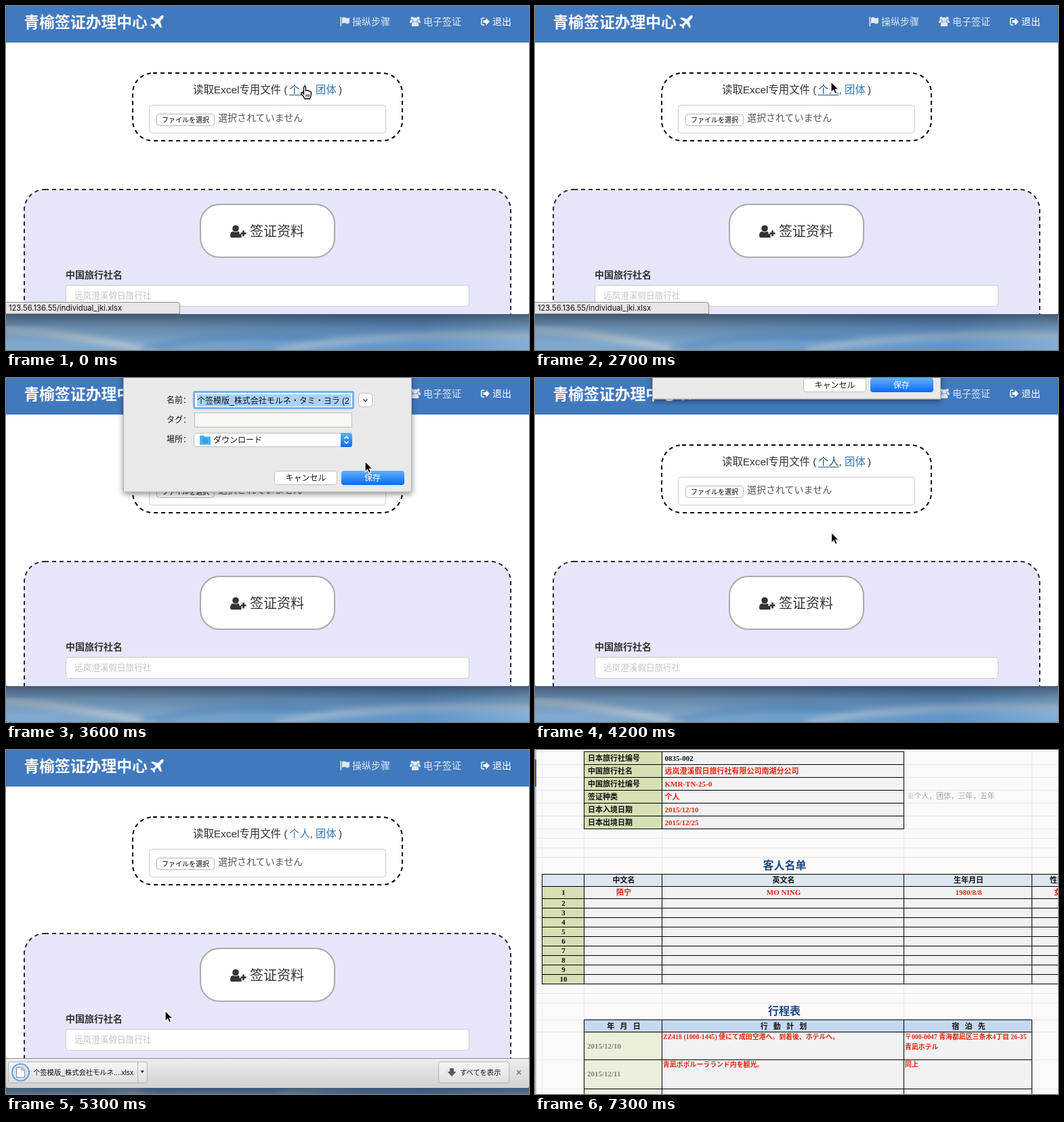
Animation of 772x508 px, one loop 7400 ms. Source, as an HTML page:

```html
<!DOCTYPE html>
<html lang="zh-CN">
<head>
<meta charset="utf-8">
<title>签证资料</title>
<style>
html, body { margin: 0; width: 100%; height: 100%; overflow: hidden; background: #fff; }
svg { display: block; width: 772px; height: 508px; }
text { font-family: "Liberation Sans", "Noto Sans CJK SC", "Noto Sans CJK", sans-serif; white-space: pre; }
.ja { font-family: "Liberation Sans", "Noto Sans CJK JP", "Noto Sans CJK", sans-serif; }
.ui { font-size: 12px; fill: #111; }
.bar { font-size: 10.3px; font-weight: 500; fill: #111; }
.sheet text { font-family: "Liberation Serif", "Noto Sans CJK SC", "Noto Sans CJK", serif; font-weight: 700; }
.nav { font-size: 14px; fill: #dfe8f4; }
.b { font-weight: 700; }
.mid { text-anchor: middle; }
</style>
</head>
<body>
<svg viewBox="0 0 772 508" xmlns="http://www.w3.org/2000/svg">
  <defs>
    <linearGradient id="sky">
      <stop offset="0" stop-color="#7ea9cf"/><stop offset=".3" stop-color="#7da4c8"/>
      <stop offset=".55" stop-color="#6d9dcb"/><stop offset=".8" stop-color="#5f94c8"/><stop offset="1" stop-color="#83aed6"/>
    </linearGradient>
    <linearGradient id="shade" x2="0" y2="1">
      <stop offset="0" stop-color="#223044" stop-opacity=".65"/><stop offset=".45" stop-color="#223044" stop-opacity=".25"/>
      <stop offset="1" stop-color="#223044" stop-opacity="0"/>
    </linearGradient>
    <linearGradient id="grey" x2="0" y2="1"><stop offset="0" stop-color="#ededed"/><stop offset="1" stop-color="#d3d3d3"/></linearGradient>
    <linearGradient id="pale" x2="0" y2="1"><stop offset="0" stop-color="#f6f6f6"/><stop offset="1" stop-color="#dedede"/></linearGradient>
    <linearGradient id="blue" x2="0" y2="1"><stop offset="0" stop-color="#5fb2fb"/><stop offset="1" stop-color="#0a6af4"/></linearGradient>
    <linearGradient id="tile" x2="0" y2="1"><stop offset="0" stop-color="#7d9fd2"/><stop offset="1" stop-color="#3d62a8"/></linearGradient>
    <linearGradient id="snow" x2="0" y2="1"><stop offset="0" stop-color="#fff"/><stop offset="1" stop-color="#dce3ee"/></linearGradient>
    <filter id="blur"><feGaussianBlur stdDeviation="5"/></filter>
    <filter id="drop" x="-10%" y="-10%" width="120%" height="125%"><feDropShadow dx="0" dy="3" stdDeviation="4" flood-opacity=".45"/></filter>
    <clipPath id="view"><path d="M0 0H772V451Q772 455 768 455H4Q0 455 0 451Z"/></clipPath>
    <clipPath id="wipe"><rect id="wipeBox" y="455" width="0" height="44"/></clipPath>
    <clipPath id="nameClip"><rect x="280" y="22" width="229" height="22"/></clipPath>
  </defs>

  <rect y="440" width="772" height="68" fill="url(#sky)"/>
  <g filter="url(#blur)" fill="none" stroke-width="9">
    <path d="M-20 476Q90 480 220 512" stroke="#c8cfd3" opacity=".75"/>
    <path d="M200 508Q320 478 480 494" stroke="#4c86be" opacity=".6"/>
    <path d="M400 510Q560 478 790 488" stroke="#c5cdd4" opacity=".6"/>
  </g>

  <g id="shelf">
    <rect y="499" width="772" height="42" fill="url(#shade)"/>
    <rect y="440" width="772" height="59" rx="4" fill="#d3d3d3"/>
    <rect y="456" width="772" height="40" fill="url(#grey)"/>
    <path d="M0 455.5H772" stroke="#8d8d8d"/>
    <g clip-path="url(#wipe)">
      <rect x="3.5" y="460.5" width="205" height="31" rx="3" fill="url(#pale)" stroke="#b0b0b0"/>
      <path d="M194.5 461V491" stroke="#b8b8b8"/>
      <path d="M198.500 473.500h5.500l-2.700 3.500z" fill="#222"/>
      <circle id="ring" cx="21.500" cy="476" r="12.500" fill="#cfe3f8" stroke="#3d87dc" stroke-width="2"/>
      <path d="M15.500 468.500h7.500l4.500 4.500v10.500h-12zM23 468.500v4.500h4.500" fill="#fff" stroke="#8a8a8a"/>
      <text class="ja bar" x="40" y="480">个签模版_株式会社モルネ....xlsx</text>
    </g>
    <rect x="638.5" y="460.5" width="104" height="31" rx="3" fill="url(#pale)" stroke="#b0b0b0"/>
    <path d="M655 470h6v5h3.500l-6.500 7-6.500-7h3.500z" fill="#585858"/>
    <text class="ja bar" x="670" y="480">すべてを表示</text>
    <path d="M754 473l6 6m0-6l-6 6" stroke="#777" stroke-width="1.5"/>
  </g>

  <g clip-path="url(#view)">
    <rect width="772" height="456" fill="#fff"/>
    <rect width="772" height="54" fill="#4179bf"/>
    <text class="b" x="26.500" y="31.500" font-size="22.800" fill="#fff">青榆签证办理中心</text>
    <path fill="#fff" d="M232 14c1.500 1.500 0 4-2 6l-2.500 2.500 2.500 8.500-2 1.500-4.500-7-4 4 .5 3-1.500 1.300-2-3.500-3.500-2 1.300-1.500 3 .5 4-4-7-4.500 1.500-2 8.500 2.500 2.500-2.500c2-2 4-3.500 5.200-2.800z"/>
    <g fill="#dfe8f4">
      <path d="M493.500 16h1.600v14h-1.600zM496 17.500q3-2 5.500 0 2.500 1.200 5.500-.5v8q-3 2-5.500.5-2.500-1.300-5.500.5z"/>
      <circle cx="604" cy="20" r="3.300"/><circle cx="599.500" cy="18" r="2.200"/><circle cx="608.500" cy="18" r="2.200"/>
      <path d="M599 30q-1-6.500 3-6.500h4q4 0 3 6.500zM596 25q0-4.500 2.500-4.500h1.500q0 2 1 2.500-2 .5-2.500 2zM612 25q0-4.500-2.500-4.500h-1.500q0 2-1 2.500 2 .5 2.500 2z"/>
    </g>
    <path d="M706 18h-2.500q-1.700 0-1.700 1.700v6.600q0 1.700 1.700 1.700h2.500" fill="none" stroke="#fff" stroke-width="1.500"/>
    <path d="M704.500 21h4v-3.500l5.500 5.500-5.500 5.500v-3.500h-4z" fill="#fff"/>
    <text class="nav" x="511" y="28">操纵步骤</text>
    <text class="nav" x="616" y="28">电子签证</text>
    <text class="nav" x="718" y="28" style="fill:#fff">退出</text>

    <rect x="187" y="99" width="398" height="100" rx="30" fill="none" stroke="#000" stroke-width="2" stroke-dasharray="6 5"/>
    <g font-size="15.400" fill="#333">
      <text x="276" y="129">读取Excel专用文件 (</text>
      <text id="link" x="418" y="129">个人</text>
      <text x="448.500" y="129">,</text>
      <text x="457" y="129" fill="#337ab7">团体</text>
      <text x="491" y="129">)</text>
    </g>
    <path id="under" d="M418 131.500H448.500" stroke="#23527c"/>
    <rect x="211.5" y="146.5" width="349" height="41" rx="4" fill="#fff" stroke="#ccc"/>
    <rect x="222.5" y="159.500" width="85" height="17" rx="4" fill="#fff" stroke="#b4b4b4"/>
    <text class="ja" x="230" y="171.500" font-size="10" fill="#000">ファイルを選択</text>
    <text class="ja" x="313" y="169.500" font-size="14" fill="#555">選択されていません</text>

    <rect x="27" y="271" width="718" height="300" rx="30" fill="#e6e6fa" stroke="#2a2a30" stroke-width="2" stroke-dasharray="6 5"/>
    <rect x="287" y="293" width="198" height="78" rx="28" fill="#fff" stroke="#aaa" stroke-width="2"/>
    <g fill="#333">
      <circle cx="339" cy="328.500" r="4.800"/>
      <path d="M333 342q-2 0-2-3 0-6 4.500-6 3.500 2 7 0l2 .8v3h3v5.200zM346.500 334.500h2.700v-3h2.600v3h2.700v2.700h-2.700v3h-2.600v-3h-2.700z"/>
      <text x="360" y="339.500" font-size="20">签证资料</text>
      <text class="b" x="88" y="402" font-size="14">中国旅行社名</text>
    </g>
    <rect x="88.5" y="412.5" width="595" height="31" rx="4" fill="#fff" stroke="#ccc"/>
    <text x="101" y="432" font-size="12.600" fill="#c3c3c3">远岚澄溪假日旅行社</text>
  </g>

  <g id="status">
    <path d="M-1 437.500H253Q256.500 437.500 256.500 441V454.500H-1Z" fill="#e6e6e6" stroke="#8c8c8c"/>
    <text x="4" y="450" font-size="11.200" fill="#111" style="font-family:Inter,sans-serif">123.56.136.55/individual_jki.xlsx</text>
  </g>

  <g id="badge">
    <rect x="3.500" y="190.500" width="119" height="113" rx="9" fill="url(#tile)" stroke="#8c9fbe" stroke-width="2" filter="url(#drop)"/>
    <path d="M43 209H82Q84 209 84 211V248H100Q103 248 101 251L65 285Q62 288 59 285L24 251Q22 248 25 248H41V211Q41 209 43 209Z" fill="url(#snow)"/>
  </g>

  <g id="dialog">
    <rect x="173.500" y="-20" width="425" height="188" fill="#e9e9ea" stroke="#b5b5b5" filter="url(#drop)"/>
    <g class="ui">
      <text class="ja" x="237" y="37">名前：</text>
      <text class="ja" x="237" y="66">タグ：</text>
      <text class="ja" x="237" y="95">場所：</text>
    </g>
    <rect x="277.500" y="20.500" width="235" height="24" rx="2" fill="#fff" stroke="#70b3f2" stroke-width="3"/>
    <g clip-path="url(#nameClip)">
      <rect x="282" y="24" width="228" height="18" fill="#a9d1fb"/>
      <text class="ja ui" x="282" y="37.500">个签模版_株式会社モルネ・タミ・ヨラ (2</text>
    </g>
    <rect x="520.500" y="22.500" width="20" height="20" rx="4" fill="#fff" stroke="#bbb"/>
    <path d="M527.500 31.500l3 3 3-3" fill="none" stroke="#333" stroke-width="1.500"/>
    <rect x="278.500" y="51.500" width="232" height="21" fill="#f9f7f3" stroke="#bcbcbc"/>
    <rect x="277.500" y="81.500" width="233" height="20" rx="4" fill="#fff" stroke="#c0c0c0"/>
    <path d="M494 81H507Q511 81 511 85V98Q511 102 507 102H494Z" fill="url(#blue)"/>
    <path d="M499.500 89.500l3-3 3 3m-6 4l3 3 3-3" fill="none" stroke="#fff" stroke-width="1.500"/>
    <path d="M286 85h6l1.500 1.500h8.500v12h-16z" fill="#45b4ec"/>
    <circle cx="294" cy="92.500" r="3.500" fill="none" stroke="#2487c4"/>
    <path d="M294 90v4m-1.500-1.500l1.500 1.500 1.500-1.500" fill="none" stroke="#2487c4"/>
    <text class="ja ui" x="306" y="95.500">ダウンロード</text>
    <rect x="396.500" y="137.500" width="92" height="20" rx="4" fill="#fff" stroke="#c0c0c0"/>
    <text class="ja ui mid" x="442.500" y="152">キャンセル</text>
    <rect x="495" y="137" width="93" height="21" rx="4" fill="url(#blue)"/>
    <text class="ja ui mid" x="541" y="152" style="fill:#fff">保存</text>
  </g>

  <g id="sheet" class="sheet"></g>

  <g id="arrow">
    <path d="M0 0V15.500L3.600 12.200 6 17.600 8.700 16.400 6.400 11.200H11.200Z" fill="#000" stroke="#fff" stroke-width="1.200"/>
  </g>
  <g id="hand">
    <path d="M-1.500 1.500Q-1.500 0 0 0 1.500 0 1.500 1.500V6Q3 4.500 4.300 6.300 6 5.300 7 7.200 9.300 6.500 9.300 9V12Q9 15 7.500 18H0Q-2.500 13.500-5 11-6 9 -4 9 -2.500 9.300-1.500 11Z" fill="#fff" stroke="#000" stroke-width="1.300"/>
    <path d="M2 11.500v3.500m2.200-3.500v3.500m2.200-3.500v3.500" stroke="#000"/>
  </g>
</svg>
<script>
const LOOP = 7400, STEP = 100;
const $ = id => document.getElementById(id);
const set = (id, attrs) => { for (const k in attrs) $(id).setAttribute(k, attrs[k]); };
const show = (id, on) => set(id, { visibility: on ? 'visible' : 'hidden' });
const prog = (t, a, b) => Math.min(1, Math.max(0, (t - a) / (b - a)));
const ease = p => p * p * (3 - 2 * p);

// Spreadsheet
const RED = '#e3220e', NAVY = '#1f4788', GREEN = '#d5e0b4', CELL = '#f2f2f2', HEAD = '#dce7f3';
const cols = [10, 72, 187, 544, 733, 800];

const cell = (c, y, h, fill) =>
  `<rect x="${cols[c] + .5}" y="${y + .5}" width="${cols[c + 1] - cols[c]}" height="${h}" fill="${fill}" stroke="#000"/>`;
const label = (s, x, y, fill = '#111', size = 11, cls = '') =>
  `<text x="${x}" y="${y}" fill="${fill}" font-size="${size}" class="${cls}">${s}</text>`;
const mid = (s, x, y, fill, size) => label(s, x, y, fill, size, 'mid');

function buildSheet() {
  let out = '<rect width="772" height="508" fill="#fbfaf8"/>';
  for (const y of [2, 21, 40, 59, 78, 97, 116, 130, 144, 158, 183, 345, 359, 373, 398, 416, 457, 500])
    out += `<path d="M2 ${y + .5}H772" stroke="#e5e8f0"/>`;
  for (const x of cols) out += `<path d="M${x + .5} 0V508" stroke="#e5e8f0"/>`;
  out += '<rect width="2" height="508" fill="#b9c0cc"/><rect y="14" width="2" height="40" fill="#2f558f"/>';

  const info = [
    ['日本旅行社编号', '0835-002'], ['中国旅行社名', '远岚澄溪假日旅行社有限公司南湖分公司'],
    ['中国旅行社编号', 'KMR-TN-25-0'], ['签证种类', '个人'],
    ['日本入境日期', '2015/12/10'], ['日本出境日期', '2015/12/25']
  ];
  info.forEach(([key, value], i) => {
    const y = 2 + 19 * i;
    out += cell(1, y, 19, GREEN) + cell(2, y, 19, CELL);
    out += label(key, 78, y + 13.5) + label(value, 191.5, y + 13.5, i ? RED : '#111');
  });
  out += label('※个人，团体，三年，五年', 549, 72, '#a0a0a0', 10.8).replace('<text', '<text style="font-weight:400"');

  out += mid('客人名单', 368.5, 176, NAVY, 16);
  for (let r = 0; r < 11; r++) {
    const y = r < 2 ? 183 + 18 * r : 219 + 14 * (r - 2), h = r < 2 ? 18 : 14;
    for (let c = 0; c < 5; c++) out += cell(c, y, h, r ? (c ? CELL : GREEN) : HEAD);
    if (r) out += mid(r, 42, y + h / 2 + 4);
  }
  const centers = [131, 367, 640];
  ['中文名', '英文名', '生年月日'].forEach((s, i) => out += mid(s, centers[i], 196));
  ['陌宁', 'MO NING', '1980/8/8'].forEach((s, i) => out += mid(s, centers[i], 214, RED));
  out += label('性别', 760, 196) + label('女', 766, 214, RED);

  out += mid('行程表', 368, 391, NAVY, 16);
  const days = [[416, 41, '2015/12/10'], [457, 43, '2015/12/11'], [500, 43, '']];
  for (const [y, h, date] of days) {
    out += cell(1, y, h, '#e9efda') + cell(2, y, h, CELL) + cell(3, y, h, CELL);
    out += label(date, 77, y + 24.5, '#808080');
  }
  ['年   月   日', '行   動   計   划', '宿   泊   先'].forEach((s, i) =>
    out += cell(i + 1, 398, 18, '#c5d8f1') + mid(s, centers[i], 411.5));
  out += label('ZZ418 (1000-1445) 便にて成田空港へ。到着後、ホテルへ。', 189, 427, RED, 9.9, 'ja');
  out += label('〒000-0047 青海都凪区三条木4丁目 26-35', 546, 427, RED, 9.9, 'ja');
  out += label('青凪ホテル', 546, 442, RED, 9.9, 'ja');
  out += label('青凪ポポルーラランド内を観光。', 189, 468, RED, 9.9, 'ja') + label('同上', 546, 468, RED, 9.9);
  $('sheet').innerHTML = out;
}

// Pointer path: time, x, y
const path = [
  [0, 441, 119], [200, 441, 122], [700, 440, 190], [1000, 440, 190], [1300, 430, 110], [1500, 437, 112],
  [3100, 437, 112], [3600, 530, 123], [3800, 545, 144], [4000, 545, 144], [4400, 330, 312],
  [4700, 270, 359], [5300, 235, 385], [6000, 118, 476], [LOOP, 118, 476]
];
function pointer(t) {
  const i = path.findIndex(k => k[0] > t);
  const [a, b] = [path[i - 1], path[i]], p = ease(prog(t, a[0], b[0]));
  return [a[1] + (b[1] - a[1]) * p, a[2] + (b[2] - a[2]) * p];
}

function draw(t) {
  const sheet = t >= 6900;
  const hover = t < 400 || (t >= 1300 && t < 5200);
  const hand = t < 400 || (t >= 1400 && t < 2600);
  const [x, y] = pointer(t);
  const move = { transform: `translate(${x} ${y})` };
  set('arrow', move);
  set('hand', move);
  show('arrow', !hand && !sheet);
  show('hand', hand);
  show('sheet', sheet);

  set('link', { fill: hover ? '#23527c' : '#337ab7' });
  show('under', hover);
  show('status', t < 500 || (t >= 1400 && t < 3100));

  const down = ease(prog(t, 2800, 3200)) - ease(prog(t, 4000, 4300));
  set('dialog', { transform: `translate(0 ${-185 * (1 - down)})` });
  show('dialog', down > 0);

  set('shelf', { transform: `translate(0 ${-44 * (1 - ease(prog(t, 4300, 4600)))})` });
  set('wipeBox', { width: 4 + 206 * prog(t, 4600, 4940) });
  const pulse = t < 4970 ? 1 : .5 + .5 * Math.cos((t - 4970) / 1000 * Math.PI);
  set('ring', { opacity: pulse });

  const fall = prog(t, 4500, 5100);
  set('badge', {
    transform: `translate(0 ${-63 + 189 * fall})`,
    opacity: Math.min(.9, 1.1 * Math.sin(Math.PI * fall))
  });
  show('badge', fall > 0 && fall < 1);
}

buildSheet();
const start = performance.now();
function tick() {
  const t = (performance.now() - start) % LOOP;
  draw(Math.floor(t / STEP) * STEP);
  requestAnimationFrame(tick);
}
tick();
</script>
</body>
</html>
```
